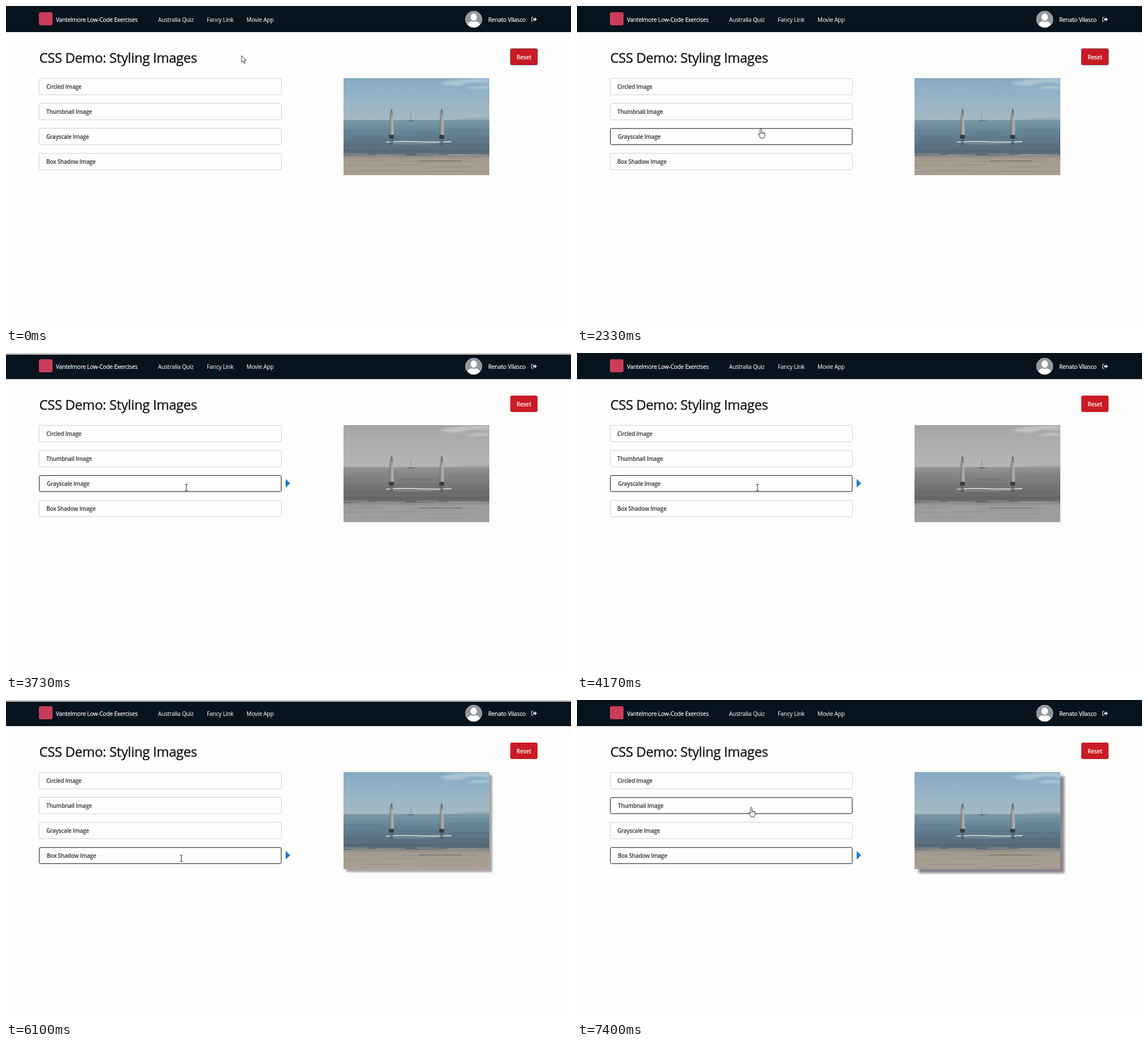
An HTML page for the animation above (8000 ms loop, 996x562 px).

```html
<!DOCTYPE html>
<html lang="en">
<head>
<meta charset="utf-8">
<title>Styling Images</title>
<style>
  html, body { margin: 0; width: 100%; height: 100%; overflow: hidden; }
  body {
    position: relative; background: #fdfdfc; color: #2b2f33;
    font: 600 10px/16px "Open Sans", "Noto Sans", sans-serif; letter-spacing: -.025em;
  }
  body > *, header > * { position: absolute; white-space: nowrap; }

  header {
    left: 0; top: 0; width: 100%; height: 46px; background: #07131d;
    color: #fff; font-weight: 400; letter-spacing: -.013em; -webkit-text-stroke: .2px;
  }
  header span { top: 15.5px; }
  header .nav { color: #dde0e3; }
  .logo { left: 58px; top: 11px; width: 24px; height: 23px; border-radius: 3px; background: #c93d5b; }
  .avatar { left: 809px; top: 8px; }
  .exit { left: 926px; top: 19px; }
  .bar { left: 0; top: 0; width: 100%; height: 3px; background: #c9c9c9; animation: bar 8s linear infinite; }

  h1 {
    left: 58.5px; top: 75.5px; margin: 0; color: #15181b;
    font-size: 23.8px; font-weight: 400; line-height: 30px; letter-spacing: -.0135em;
    -webkit-text-stroke: .4px;
  }

  .reset {
    left: 889px; top: 75px; width: 48px; height: 29px; border-radius: 3px;
    background: #c91b25; color: #fff; line-height: 30px; letter-spacing: -.01em; text-align: center;
    animation: focus 8s step-end infinite;
  }

  .row {
    left: 58px; width: 428px; height: 30px; box-sizing: border-box; padding-left: 12px;
    display: flex; align-items: center; border: 1px solid #d2d2cf; border-radius: 3px;
    animation: 8s step-end infinite;
  }
  .r1 { top: 127px; animation-name: row1; }
  .r2 { top: 171px; animation-name: row2; }
  .r3 { top: 215px; animation-name: row3; }
  .r4 { top: 259px; animation-name: row4; }

  .mark {
    left: 493px; width: 8px; height: 15px; background: #1b7bcd; opacity: 0;
    clip-path: polygon(0 0, 100% 50%, 0 100%); animation: 8s linear infinite;
  }
  .m3 { top: 222px; animation-name: mark3; }
  .m4 { top: 266px; animation-name: mark4; }

  .photo { left: 595px; top: 127px; width: 257px; height: 171px; animation: gray 8s linear infinite, shadow 8s linear infinite; }

  .cursor { left: 0; top: 0; animation: move 8s linear infinite; }
  .cursor svg { position: absolute; left: -10px; top: -10px; animation: 8s step-end infinite; }
  .cursor .arrow { animation-name: arrow; }
  .cursor .hand { animation-name: hand; }
  .cursor .beam { animation-name: beam; }

  @keyframes bar {
    0%, .6%, 10%, 41.6%, 51.5%, 73.2%, 83%, 100% { opacity: 0; }
    3.5%, 7%, 45%, 48%, 76.2%, 79.5% { opacity: 1; }
  }
  @keyframes focus {
    0% { box-shadow: 0 0 0 1px #8fcfe8; }
    40.6%, 100% { box-shadow: none; }
  }
  @keyframes row1 {
    0%, 22.5%, 100% { border-color: #d2d2cf; box-shadow: none; padding-left: 12px; }
    19.8% { border-color: #5c5f58; box-shadow: inset 0 0 0 1px #a9aba5; padding-left: 13px; }
  }
  @keyframes row2 {
    0%, 26.6% { border-color: #d2d2cf; box-shadow: none; padding-left: 12px; }
    23.9%, 91.8%, 100% { border-color: #5c5f58; box-shadow: inset 0 0 0 1px #a9aba5; padding-left: 13px; }
  }
  @keyframes row3 {
    0%, 73.1%, 90.8%, 100% { border-color: #d2d2cf; box-shadow: none; padding-left: 12px; }
    28%, 89% { border-color: #5c5f58; box-shadow: inset 0 0 0 1px #a9aba5; padding-left: 13px; }
  }
  @keyframes row4 {
    0% { border-color: #d2d2cf; box-shadow: none; padding-left: 12px; }
    60.2%, 100% { border-color: #5c5f58; box-shadow: inset 0 0 0 1px #a9aba5; padding-left: 13px; }
  }
  @keyframes mark3 {
    0%, 41.4%, 75.5%, 100% { opacity: 0; transform: translateX(-8px); }
    44.5%, 73.1% { opacity: 1; transform: none; }
  }
  @keyframes mark4 {
    0%, 73.1% { opacity: 0; transform: translateX(-8px); }
    76.2%, 100% { opacity: 1; transform: none; }
  }
  @keyframes gray {
    0%, 40.3%, 75.6%, 100% { filter: grayscale(0); }
    41.9%, 73.1% { filter: grayscale(1); }
  }
  @keyframes shadow {
    0%, 73.1% { box-shadow: 0 0 0 transparent; }
    77.3%, 100% { box-shadow: 7px 7px 4px #88848c; }
  }
  @keyframes move {
    0% { transform: translate(415px, 87px); }
    10%, 15.6% { transform: translate(402px, 82px); }
    28.1%, 31.2% { transform: translate(324px, 216px); }
    37.5%, 56.2% { transform: translate(318px, 237px); }
    63.8%, 86.8% { transform: translate(309px, 279px); }
    92.5%, 100% { transform: translate(307px, 189px); }
  }
  @keyframes arrow {
    0%, 22.5%, 26.6%, 57.5%, 88%, 90.8% { opacity: 1; }
    19.8%, 23.9%, 28%, 60.2%, 89%, 91.8%, 100% { opacity: 0; }
  }
  @keyframes hand {
    0%, 22.5%, 26.6%, 41.2%, 73.1%, 90.8% { opacity: 0; }
    19.8%, 23.9%, 28%, 60.2%, 89%, 91.8%, 100% { opacity: 1; }
  }
  @keyframes beam {
    0%, 57.5%, 88%, 100% { opacity: 0; }
    41.2%, 73.1% { opacity: 1; }
  }
</style>
</head>
<body>
<header>
  <div class="logo"></div>
  <span style="left:88px">Vantelmore Low-Code Exercises</span>
  <span class="nav" style="left:268px">Australia Quiz</span>
  <span class="nav" style="left:354px">Fancy Link</span>
  <span class="nav" style="left:424px">Movie App</span>
  <svg class="avatar" width="31" height="31">
    <clipPath id="disc"><circle cx="15.5" cy="15.5" r="14"/></clipPath>
    <circle cx="15.5" cy="15.5" r="14.5" fill="#92989e" stroke="#b4b9bd"/>
    <g fill="#fff" clip-path="url(#disc)">
      <ellipse cx="15.5" cy="11.5" rx="5.6" ry="6.5"/>
      <path d="M4 30c0-8 3-10 8-11q3.500 2 7 0c5 1 8 3 8 11z"/>
    </g>
  </svg>
  <span style="left:850px">Renato Vilasco</span>
  <svg class="exit" width="10" height="9">
    <path d="M4 1H1.500q-1 0-1 1v5q0 1 1 1H4" fill="none" stroke="#d4d7da" stroke-width="1.200"/>
    <path d="M3 3h3V.8l4 3.700-4 3.700V6H3z" fill="#d4d7da"/>
  </svg>
</header>
<div class="bar"></div>

<h1>CSS Demo: Styling Images</h1>
<div class="reset">Reset</div>

<div class="row r1">Circled Image</div>
<div class="row r2">Thumbnail Image</div>
<div class="row r3">Grayscale Image</div>
<div class="row r4">Box Shadow Image</div>
<div class="mark m3"></div>
<div class="mark m4"></div>

<svg class="photo" viewBox="0 0 257 171">
  <defs>
    <linearGradient id="sky" x2="0" y2="1">
      <stop stop-color="#86abc5"/><stop offset=".6" stop-color="#9ab5c4"/><stop offset="1" stop-color="#a6b9c1"/>
    </linearGradient>
    <linearGradient id="sea" x2="0" y2="1">
      <stop stop-color="#7b99a5"/><stop offset=".3" stop-color="#668698"/>
      <stop offset=".7" stop-color="#5a7081"/><stop offset="1" stop-color="#5d6a70"/>
    </linearGradient>
    <linearGradient id="sand" x2="0" y2="1">
      <stop stop-color="#80827f"/><stop offset=".25" stop-color="#a59c90"/><stop offset="1" stop-color="#a89e92"/>
    </linearGradient>
    <linearGradient id="stone">
      <stop stop-color="#666a6b"/><stop offset=".5" stop-color="#a2a3a0"/><stop offset="1" stop-color="#b9b9b4"/>
    </linearGradient>
    <filter id="soft"><feGaussianBlur stdDeviation="3 1.500"/></filter>
    <g id="pillar">
      <path d="M-3 13h6l1 37h-8z" fill="url(#stone)"/>
      <path d="M-3.500 11h7v2h-7z" fill="#85898a"/>
      <circle cy="8" r="2.700" fill="#7a7e80"/>
      <path d="M-1.500 5.500l.5-3 2-.5.8 3.500z" fill="#5c6266"/>
      <path d="M-4 47h8l.5 6q-4.500 2-9 0z" fill="#343b40"/>
      <path d="M-3 56h6l-.5 9h-5z" fill="#3e4d59" opacity=".5"/>
    </g>
  </defs>
  <rect width="257" height="76" fill="url(#sky)"/>
  <g fill="#c2d5de" filter="url(#soft)" opacity=".6">
    <path d="M170 9q25-9 87-8v9q-30-5-45 1t-42-2z"/>
    <path d="M215 19q20-7 42-4v4z"/>
  </g>
  <path d="M190 74q30-5 67-4v5h-67z" fill="#94aab3"/>
  <rect y="74" width="257" height="64" fill="url(#sea)"/>
  <g fill="none" stroke="#425b6e" opacity=".35">
    <path d="M0 93h65m35 3h60m26-5h71M15 105h50m30-1h68m30 3h64M0 119h70m25 3h65m25-4h72"/>
    <path d="M0 128h257" stroke-width="3"/>
  </g>
  <path d="M0 137q40-3 85-1t90-1 82 2v34H0z" fill="url(#sand)"/>
  <path d="M0 134h45m12 1h52m20-1h38m16 1h74" fill="none" stroke="#a7b0b2" stroke-width="1.500" opacity=".6"/>
  <g fill="none" stroke="#857d73" opacity=".5">
    <path d="M10 145h62m30 2h50m25 0h60M0 154h45m24-1h60m25 3h70M30 163h70m40 1h75"/>
    <path d="M133 146h75" stroke="#655f58" stroke-width="2"/>
  </g>
  <path d="M75 113q25-2 50-1t65 0" fill="none" stroke="#c9d2d4" stroke-width="2"/>
  <path d="M85 115q40 2 85-1" fill="none" stroke="#96a7b0"/>
  <path d="M118.500 61v13" stroke="#78909b"/>
  <path d="M112 74h13l-1.500 2.500h-10z" fill="#60798a"/>
  <use href="#pillar" x="84.500" y="53"/>
  <use href="#pillar" x="173" y="53"/>
</svg>

<div class="cursor">
  <svg class="arrow" width="30" height="34" viewBox="-10 -10 30 34">
    <path d="M.3.5v11.600l2.700-2.500 2 4.400 1.900-.8-2-4.400h3.700z" fill="#fff" stroke="#222" stroke-width=".9"/>
  </svg>
  <svg class="hand" width="30" height="34" viewBox="-10 -10 30 34">
    <path d="M-1.300 10V1.300Q-1.200 0 0 0t1.300 1.300v5q1.300-.9 2 .5 1.400-.7 2 .6 1.600-.5 1.700 1.100v3.500q0 2.500-1.500 5H-.5Q-1.500 14-4 11q-1-1.300 0-1.900 1-.4 2.700 1.900z" fill="#fff" stroke="#222" stroke-width=".9" stroke-linejoin="round"/>
    <path d="M1.300 6v3m2-2v2.500m2-2V10" stroke="#222" stroke-width=".8"/>
  </svg>
  <svg class="beam" width="30" height="34" viewBox="-10 -10 30 34">
    <path d="M-2.500-5.500h2l.5.500.5-.500h2M0-5V5M-2.500 5.500h2L0 5l.5.500h2" fill="none" stroke="#222"/>
  </svg>
</div>
</body>
</html>
```
